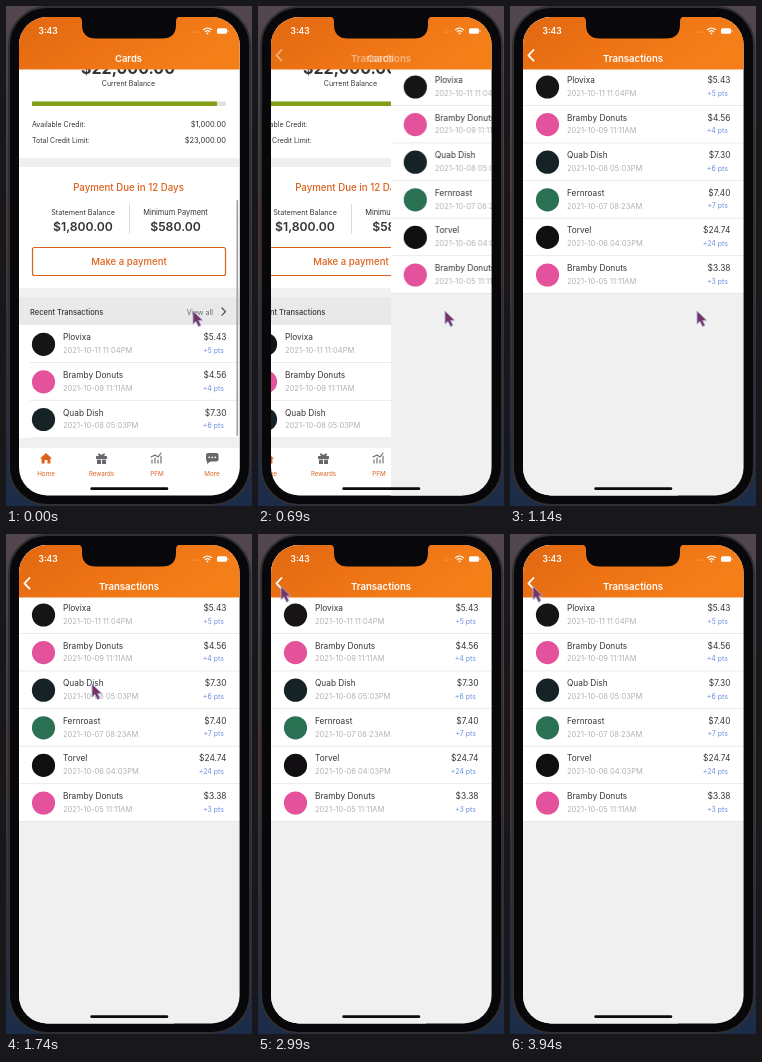
These frames come from a looping animation (246x500 px, 3990 ms). An HTML page:

```html
<!DOCTYPE html>
<html lang="en">
<head>
<meta charset="utf-8">
<title>Cards</title>
<style>
  html, body { margin: 0; width: 100%; height: 100%; overflow: hidden; background: #1b2030; }
  svg { display: block; width: 246px; height: 500px; font-family: Inter, Roboto, sans-serif; }
</style>
</head>
<body>
<svg id="stage" viewBox="0 0 246 500"></svg>
<script>
const LOOP = 3990;
const ORANGE = '#dc611b', INK = '#333438', MUTED = '#b1b1b5', BLUE = '#6d8fe0', ICON = '#68686c';

const transactions = [
  ['Plovixa', '2021-10-11 11:04PM', '$5.43', '+5 pts', '#171416'],
  ['Bramby Donuts', '2021-10-09 11:11AM', '$4.56', '+4 pts', '#e4529c'],
  ['Quab Dish', '2021-10-08 05:03PM', '$7.30', '+6 pts', '#162326'],
  ['Fernroast', '2021-10-07 08:23AM', '$7.40', '+7 pts', '#2b7154'],
  ['Torvel', '2021-10-06 04:03PM', '$24.74', '+24 pts', '#100e11'],
  ['Bramby Donuts', '2021-10-05 11:11AM', '$3.38', '+3 pts', '#e4529c']
];

const text = (x, y, size, label, fill = INK, weight = 400, anchor = 'start') =>
  `<text x="${x}" y="${y}" font-size="${size}" fill="${fill}" font-weight="${weight}" text-anchor="${anchor}">${label}</text>`;
const middle = (x, y, size, label, fill, weight) => text(x, y, size, label, fill, weight, 'middle');
const right = (x, y, size, label, fill, weight) => text(x, y, size, label, fill, weight, 'end');
const rect = (x, y, w, h, fill, rx = 0) =>
  `<rect x="${x}" y="${y}" width="${w}" height="${h}" rx="${rx}" fill="${fill}"/>`;
const dots = (xs, y, r, fill) => xs.map(x => `<circle cx="${x}" cy="${y}" r="${r}" fill="${fill}"/>`).join('');
const stroke = (d, color, width) =>
  `<path d="${d}" fill="none" stroke="${color}" stroke-width="${width}" stroke-linecap="round" stroke-linejoin="round"/>`;

// Rows are 37.6 px high; `top` is the upper edge of the first one.
const list = (items, top, inset) => items.map(([name, date, amount, points, color], i) => {
  const y = top + i * 37.6;
  return dots([37.5], y + 19, 11.6, color) +
    text(57, y + 15, 8.3, name) +
    text(57, y + 27.8, 7.5, date, MUTED) +
    right(220.5, y + 15, 8.4, amount) +
    right(218, y + 27.6, 7, points, BLUE) +
    rect(13 + inset, y + 37, 221 - inset, .7, '#e2e2e4');
}).join('');

const tabIcons =
  `<path d="M34 452.6L40 447l6 5.6h-1.6v4.9h-3v-3.4h-2.8v3.4h-3v-4.9z" fill="${ORANGE}"/>` +
  rect(90, 450, 11, 3, ICON, .5) + rect(91, 453.6, 4, 4.4, ICON) + rect(96, 453.6, 4, 4.4, ICON) +
  stroke('M95.5 450c-5-1-3-4 0 0c3-4 5-1 0 0', ICON, 1.1) +
  stroke('M146 457v-3M149 457v-5M152 457v-3M155 457v-7M145 451l4-2 3 2 3-4', ICON, 1.1) +
  rect(200, 447, 12.5, 8.5, ICON, 2) + `<path d="M201 454v4l4-3z" fill="${ICON}"/>` +
  dots([203.2, 206.2, 209.2], 451.3, .9, '#fff');

const cards =
  rect(13, 10, 221, 480, '#fff') +
  middle(122, 68, 16, '$22,000.00', INK, 700) +
  middle(122.5, 79.5, 7, 'Current Balance') +
  rect(26, 95.5, 194, 4.4, '#dfe3dc', 1) + rect(26, 95.5, 185, 4.4, '#829d16', 1) +
  text(26, 121, 7, 'Available Credit:') + right(220, 121, 7.5, '$1,000.00') +
  text(26, 136.5, 7, 'Total Credit Limit:') + right(220, 136.5, 7.5, '$23,000.00') +
  rect(13, 152, 221, 9, '#efeff0') +
  middle(122.5, 185, 9.7, 'Payment Due in 12 Days', ORANGE, 500) +
  middle(77, 208.5, 7.2, 'Statement Balance') + middle(169.5, 208.5, 7.4, 'Minimum Payment') +
  middle(77, 225, 12.2, '$1,800.00', INK, 600) + middle(169.5, 225, 12.2, '$580.00', INK, 600) +
  rect(123, 198, .8, 30, '#d2d2d4') +
  `<rect x="26.5" y="241.5" width="193" height="28" rx="2" fill="#fff" stroke="${ORANGE}" stroke-width="1.2"/>` +
  middle(123, 259, 9.6, 'Make a payment', ORANGE, 500) +
  rect(13, 282, 221, 9, '#f1f1f2') + rect(13, 291, 221, 28, '#e9e9ea') +
  text(24, 308.5, 7.5, 'Recent Transactions', INK, 500) +
  right(207, 308.5, 7.2, 'View all', '#68686d') +
  stroke('M216 302l3.5 3.6l-3.5 3.6', '#444', 1.2) +
  list(transactions.slice(0, 3), 319.3, 11) +
  rect(13, 432, 221, 10, '#f0f0f1') +
  rect(230.4, 194, 1.8, 236, '#a5a5a9', .9) +
  rect(13, 442, 221, 50, '#fff') + tabIcons +
  middle(40, 469.6, 6.3, 'Home', ORANGE) + middle(95.5, 469.6, 6.2, 'Rewards', ORANGE) +
  middle(151, 469.6, 6.3, 'PFM', ORANGE) + middle(206, 469.6, 6.3, 'More', ORANGE);

const history =
  rect(13, 10, 221, 480, '#f0f0f1') + rect(13, 62, 221, 225, '#fff') +
  list(transactions, 62, 0);

const statusBar =
  text(32.5, 28, 8.5, '3:43', '#fff', 600) +
  dots([187, 189.5, 192], 26, .5, '#f9c196') +
  stroke('M197.5 23.7q4-3.4 8 0M199.3 25.6q2.2-1.8 4.4 0', '#fff', 1.2) +
  dots([201.5], 27.4, .9, '#fff') +
  rect(211, 22.3, 10, 5.4, '#fff', 1.5) + rect(221.5, 24, 1, 2, '#f9d6b9', .5);

const stage = document.getElementById('stage');
stage.innerHTML = `
  <defs>
    <linearGradient id="backdrop" x2="0" y2="1">
      <stop stop-color="#51474d"/><stop offset=".5" stop-color="#453532"/><stop offset="1" stop-color="#1b2c49"/>
    </linearGradient>
    <linearGradient id="bar" x2="1" y2=".35">
      <stop stop-color="#e26812"/><stop offset=".55" stop-color="#ee7415"/><stop offset="1" stop-color="#f47f19"/>
    </linearGradient>
    <clipPath id="screen"><rect x="13" y="11" width="220.6" height="478.5" rx="28"/></clipPath>
  </defs>
  ${rect(0, 0, 246, 500, 'url(#backdrop)')}
  <rect x="3" y="1" width="241" height="498" rx="38" fill="#08080a" stroke="#2f2f34" stroke-width="2"/>
  <g clip-path="url(#screen)">
    <g id="cards">${cards}</g>
    <g id="history">${history}</g>
    ${rect(13, 10, 221, 53.5, 'url(#bar)')}
    ${statusBar}
    <g id="cardsTitle">${middle(122.5, 56.4, 9.5, 'Cards', '#fff', 600)}</g>
    <g id="historyTitle">
      ${middle(123, 56.4, 9.6, 'Transactions', '#fff', 600)}
      ${stroke('M23.5 44l-5 5.3l5 5.3', '#fff', 1.8)}
    </g>
    ${rect(84.3, 481.3, 78, 2.8, '#0b0b0c', 1.4)}
  </g>
  <path d="M71 10.5q5 0 5 5v3q0 14 14 14h66q14 0 14-14v-3q0-5 5-5z" fill="#08080a"/>
  <path id="cursor" d="M0 0V13L3 10.5L5.5 15.5L8 14.4L5.7 9.6L9.5 9.2Z"
    fill="#763463" stroke="#a9aedb" stroke-width=".9" stroke-linejoin="round"/>`;

// Steps are [time, value]; each segment uses the given easing.
function play(id, property, steps, easing) {
  const frames = steps.map(([time, value]) => ({ offset: time / LOOP, [property]: value, easing }));
  document.getElementById(id).animate(frames, { duration: LOOP, iterations: Infinity }).startTime = 0;
}

const EASE_OUT = 'cubic-bezier(.215,.61,.355,1)';
const push = (from, to) => [[0, from], [614, from], [1054, to], [LOOP, to]];
const shift = (x, y = 0) => `translate(${x}px, ${y}px)`;

play('cards', 'transform', push(shift(0), shift(-66)), EASE_OUT);
play('history', 'transform', push(shift(220), shift(0)), EASE_OUT);
play('cardsTitle', 'opacity', push(1, 0), EASE_OUT);
play('historyTitle', 'opacity', push(0, 1), EASE_OUT);
play('cursor', 'transform', [
  [0, shift(187, 305)], [1200, shift(187, 305)],
  [1690, shift(86, 150)], [1950, shift(86, 150)],
  [2400, shift(33, 72)], [2640, shift(33, 72)],
  [2900, shift(23, 52.5)], [LOOP, shift(23, 52.5)]
], 'ease-in-out');
</script>
</body>
</html>
```
